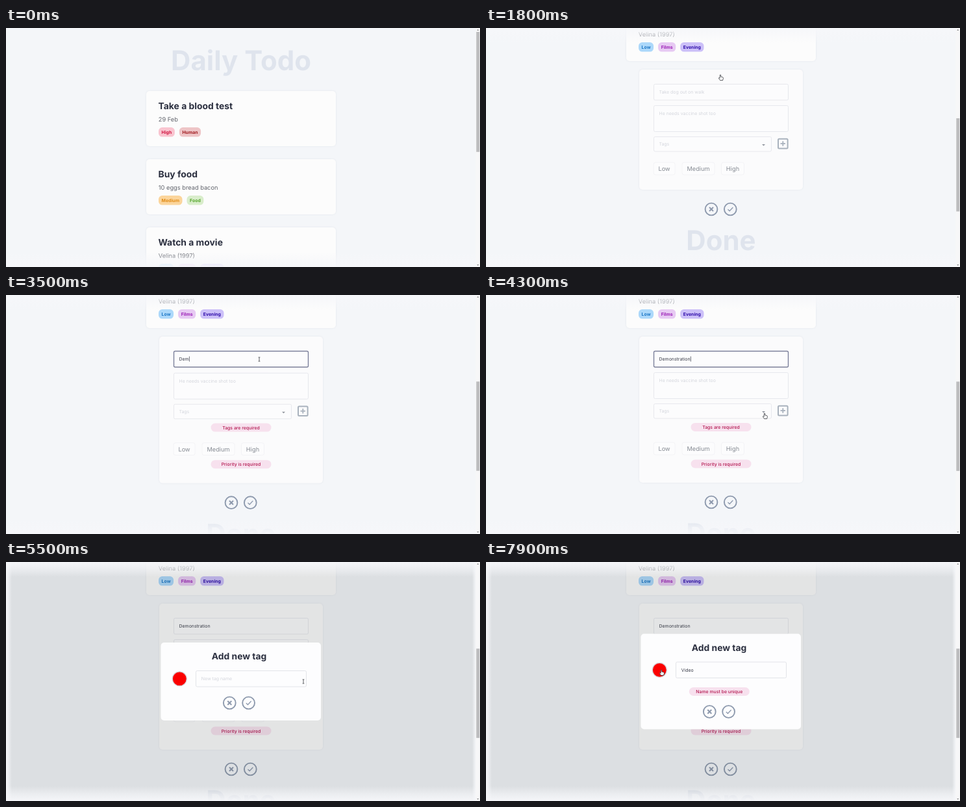
An HTML page with a canvas for the animation above (8 s loop, 730 by 368 pixels).

```html
<!DOCTYPE html>
<html lang="en">
<head>
<meta charset="utf-8">
<title>Daily Todo</title>
<style>
html, body { margin: 0; width: 100%; height: 100%; overflow: hidden; background: #f4f6f9; }
canvas { display: block; width: 730px; height: 368px; }
</style>
</head>
<body>
<canvas id="stage"></canvas>
<script>
const W = 730, H = 368, LOOP = 8000, MAX_SCROLL = 341;
const BG = '#f4f6f9', INK = '#2c3040', SLATE = '#8d99ad';
const canvas = document.getElementById('stage');
const ctx = canvas.getContext('2d');
const dpr = window.devicePixelRatio || 1;
canvas.width = W * dpr;
canvas.height = H * dpr;

const TAGS = {
  High: ['#f9c5d0', '#d0143f'],
  Human: ['#eec5c7', '#a01c20'],
  Medium: ['#fbd59c', '#e08b14'],
  Food: ['#d9edcb', '#52a528'],
  Low: ['#acd8fa', '#1c76c6'],
  Films: ['#e7caf3', '#9c20b6'],
  Evening: ['#ccc0f8', '#2d0ba9'],
  'Computer equipment': ['#cfe6e0', '#289a80']
};
const OPTIONS = ['Work', 'Human', 'Food', 'Films', 'Computer equipment', 'Video', 'Evening'];

// time, x, y of the hotspot, pointer shape from that time on
const POINTER = [
  [450, 357, 97, 'text'], [1050, 357, 97, 'text'], [1300, 361, 72, 'hand'],
  [1900, 361, 72, 'arrow'], [2150, 377, 281, 'hand'], [2850, 377, 281, 'arrow'],
  [3150, 390, 99, 'text'], [3950, 390, 99, 'text'], [4230, 429, 182, 'hand'],
  [4750, 429, 182, 'hand'], [4950, 385, 226, 'hand'], [5080, 385, 226, 'hand'],
  [5300, 462, 179, 'hand'], [5440, 462, 179, 'hand'], [5490, 458, 184, 'text'],
  [6450, 458, 184, 'text'], [6750, 374, 217, 'hand'], [6880, 374, 217, 'arrow'],
  [7120, 594, 246, 'arrow'], [7350, 682, 36, 'arrow'], [7700, 290, 192, 'arrow'],
  [7880, 270, 166, 'hand'], [8000, 270, 166, 'hand']
];

const clamp = v => Math.max(0, Math.min(1, v));
const ramp = (t, a, b) => {
  const k = clamp((t - a) / (b - a));
  return k * k * (3 - 2 * k);
};
const typed = (s, t, start, step) => s.slice(0, Math.max(0, Math.floor((t - start) / step) + 1));

function box(x, y, w, h, r, fill, stroke, line = 1) {
  ctx.beginPath();
  ctx.roundRect(x, y, w, h, r);
  if (fill) { ctx.fillStyle = fill; ctx.fill(); }
  if (stroke) { ctx.strokeStyle = stroke; ctx.lineWidth = line; ctx.stroke(); }
}

function path(points, color, width) {
  ctx.beginPath();
  points.forEach(([x, y], i) => i ? ctx.lineTo(x, y) : ctx.moveTo(x, y));
  ctx.strokeStyle = color;
  ctx.lineWidth = width;
  ctx.stroke();
}

function disc(x, y, r, fill, stroke, line) {
  ctx.beginPath();
  ctx.arc(x, y, r, 0, Math.PI * 2);
  if (fill) { ctx.fillStyle = fill; ctx.fill(); }
  if (stroke) { ctx.strokeStyle = stroke; ctx.lineWidth = line; ctx.stroke(); }
}

// cy is the middle of the capitals
function text(s, x, cy, size, color, weight = 400, align = 'left') {
  ctx.font = `${weight} ${size}px Inter, sans-serif`;
  ctx.textAlign = align;
  ctx.fillStyle = color;
  ctx.fillText(s, x, cy + size * 0.364);
  return ctx.measureText(s).width;
}

function faded(alpha, draw) {
  if (alpha <= 0) return;
  ctx.save();
  ctx.globalAlpha *= alpha;
  draw();
  ctx.restore();
}

function panel(x, y, w, h, r, fill) {
  ctx.save();
  ctx.shadowColor = 'rgba(60,70,100,.09)';
  ctx.shadowBlur = 3 * dpr;
  box(x, y, w, h, r, fill);
  ctx.restore();
}

function tagRow(names, x, cy) {
  for (const name of names) {
    const [bg, fg] = TAGS[name];
    ctx.font = '700 6.9px Inter, sans-serif';
    const w = ctx.measureText(name).width + 9.2;
    box(x, cy - 7.2, w, 14.4, 5.5, bg);
    text(name, x + 4.6, cy, 6.9, fg, 700);
    x += w + 7;
  }
}

function card(y, title, note, tags, done) {
  const h = note ? 85 : 67.5;
  panel(216, y, 292, h, 5, '#fcfcfc');
  if (done) {
    ctx.save();
    ctx.beginPath();
    ctx.rect(503, y - 1, 6, h + 2);
    ctx.clip();
    box(215, y + 0.4, 292.4, h - 0.8, 5, null, '#a9d3b4', 1.3);
    ctx.restore();
  }
  const w = text(title, 234.5, y + 23.3, 13.9, INK, 700);
  if (done) path([[234.5, y + 24.3], [234.5 + w, y + 24.3]], INK, 1.4);
  if (note) text(note, 234.8, y + 44, 9.25, '#62656d');
  tagRow(tags, 235, y + (note ? 63.3 : 45.7));
}

function roundButtons(x, y) {
  const r = 9.4, x2 = x + 29.3;
  disc(x, y, r, null, SLATE, 1.9);
  path([[x - 3, y - 3], [x + 3, y + 3]], SLATE, 2);
  path([[x + 3, y - 3], [x - 3, y + 3]], SLATE, 2);
  disc(x2, y, r, null, SLATE, 1.9);
  path([[x2 - 3.8, y + 0.3], [x2 - 1.2, y + 2.8], [x2 + 4, y - 2.8]], SLATE, 1.3);
}

function errorPill(s, cx, cy, alpha) {
  faded(alpha, () => {
    box(cx - 46.5, cy - 6.5, 93, 13, 6.5, '#f7e1ee');
    text(s, cx, cy, 6.9, '#b3164f', 500, 'center');
  });
}

function form(t, e1, e2, e3) {
  const d1 = 20 * e1, d2 = d1 + 20 * e2, d3 = d2 + 20 * e3;
  const field = '#e7e8ed', hint = '#d4d6dd';
  const focus = t > 3180 && t < 4700;
  const title = typed('Demonstration', t, 3350, 55);
  panel(236, 64, 252, 185 + d3, 5, '#fbfbfc');

  box(258.5, 86.5, 207, 24.5, 2, '#fcfcfd', focus ? '#7d819b' : field, focus ? 1.4 : 1);
  const w = title ? text(title, 266.5, 98.6, 6.95, '#383b47')
    : (text('Take dog out on walk', 266.5, 98.6, 6.95, hint), 0);
  if (focus && (t < 4050 || Math.floor((t - 4050) / 500) % 2 === 0))
    path([[267.3 + w, 94.5], [267.3 + w, 102.5]], '#30333f', 0.7);
  errorPill('Title is required', 362, 124.6, e1);

  box(258.5, 119.5 + d1, 207, 40, 2, '#fcfcfd', field);
  text('He needs vaccine shot too', 266.5, 131.8 + d1, 6.95, hint);

  box(258.5, 167.5 + d1, 181, 22.5, 2, '#fcfcfd', field);
  text('Tags', 266.5, 178.5 + d1, 6.95, hint);
  const up = t > 4700 && t < 5420 ? -1 : 1, cy = 180 + d1;
  ctx.beginPath();
  ctx.moveTo(425, cy - up);
  ctx.lineTo(430, cy - up);
  ctx.lineTo(427.5, cy + 1.5 * up);
  ctx.fillStyle = '#8f949d';
  ctx.fill();

  const hot = t > 5230 && t < 5490;
  const plus = hot ? '#178a48' : '#a9b2bd', py = 178 + d1;
  box(450, py - 7.2, 14.6, 14.6, 1.5, null, plus, 2);
  path([[453.5, py], [461, py]], plus, 1.8);
  path([[457.3, py - 3.8], [457.3, py + 3.8]], plus, 1.8);
  errorPill('Tags are required', 362, 183.4 + d2, e2);

  [['Low', 274.6, 33], ['Medium', 327, 50], ['High', 380, 35]].forEach(([s, x, bw]) => {
    box(x - bw / 2, 207 + d2, bw, 19, 3, '#fcfcfd', '#f3f3f6');
    text(s, x, 216.5 + d2, 9.25, '#868b93', 400, 'center');
  });
  errorPill('Priority is required', 362, 220 + d3, e3);
  roundButtons(347, 279 + d3);
}

function dropdown(alpha) {
  faded(alpha, () => {
    panel(260, 192, 179, 150, 3, '#ffffff');
    OPTIONS.forEach((s, i) => text(s, 267, 203 + i * 22.5, 6.95, '#4c505c'));
    box(434.5, 194, 3.5, 112, 1.5, '#c6c8cd');
  });
}

function page(t, scroll, formIn, errors) {
  const shift = 204 * formIn + 20 * errors.reduce((a, b) => a + b);
  ctx.save();
  ctx.translate(0, MAX_SCROLL - scroll);
  text('Daily Todo', 362, -291, 42, '#dfe4ed', 700, 'center');
  card(-244, 'Take a blood test', '29 Feb', ['High', 'Human']);
  card(-139, 'Buy food', '10 eggs bread bacon', ['Medium', 'Food']);
  card(-34, 'Watch a movie', 'Velina (1997)', ['Low', 'Films', 'Evening']);
  faded(1 - formIn, () => {
    disc(362, 73, 10.4, '#dde2ec');
    path([[357.5, 73], [366.5, 73]], '#fbfcfd', 1.8);
    path([[362, 68.5], [362, 77.5]], '#fbfcfd', 1.8);
  });
  ctx.save();
  ctx.translate(0, shift);
  text('Done', 362, 123, 42, '#dfe4ed', 700, 'center');
  card(170, 'Make a new dish', 'Risotto with shrimp', ['Low', 'Food'], true);
  card(275, 'Buy a new microphone', '', ['Medium', 'Computer equipment'], true);
  ctx.restore();
  faded(formIn, () => form(t, ...errors));
  ctx.restore();
  return 709 + shift;
}

function edgeFade(x0, y0, x1, y1, x, y, w, h) {
  const g = ctx.createLinearGradient(x0, y0, x1, y1);
  g.addColorStop(0, 'rgba(246,247,250,.95)');
  g.addColorStop(0.45, 'rgba(246,247,250,.6)');
  g.addColorStop(1, 'rgba(246,247,250,0)');
  ctx.fillStyle = g;
  ctx.fillRect(x, y, w, h);
}

function scrollbar(scroll, height) {
  ctx.fillStyle = '#f7f7f8';
  ctx.fillRect(723.5, 0, 6.5, H);
  ctx.fillStyle = '#bcbcbe';
  ctx.fillRect(724.3, 6 + 356 * scroll / height, 5, 356 * H / height);
  ctx.fillStyle = '#77787a';
  for (const [y, d] of [[3, -1], [365, 1]]) {
    ctx.beginPath();
    ctx.moveTo(725.3, y - d * 0.8);
    ctx.lineTo(728.3, y - d * 0.8);
    ctx.lineTo(726.8, y + d);
    ctx.fill();
  }
}

function modal(t, grow) {
  const half = 60 + 13.5 * grow, top = 184 - half;
  box(238.5, top, 246.5, half * 2, 5, '#fdfdfe');
  text('Add new tag', 359, top + 21, 13.85, INK, 700, 'center');
  disc(267.3, top + 55.8, 11, '#fb0000', '#d5d3d8', 1.2);
  box(292.5, top + 43.5, 170, 24.5, 2, '#fdfdfe', '#e3e4e9');
  const name = typed('Video', t, 6330, 60);
  text(name || 'New tag name', 300.8, top + 55.9, 6.95, name ? '#383b47' : '#d4d6dd');
  errorPill('Name must be unique', 359.3, top + 89, grow);
  roundButtons(344.3, top + 93 + 27 * grow);
}

function pointer(t) {
  if (t < POINTER[0][0]) return;
  const i = POINTER.findIndex((p, n) => n === POINTER.length - 1 || t < POINTER[n + 1][0]);
  const a = POINTER[i], b = POINTER[i + 1] || a;
  const k = ramp(t, a[0], b[0] + 0.01);
  ctx.save();
  ctx.translate(a[1] + (b[1] - a[1]) * k, a[2] + (b[2] - a[2]) * k);
  if (a[3] === 'text') {
    path([[0, -3], [0, 3]], '#33363c', 0.8);
    path([[-1.4, -3.1], [1.4, -3.1]], '#33363c', 0.7);
    path([[-1.4, 3.1], [1.4, 3.1]], '#33363c', 0.7);
  } else {
    const shape = a[3] === 'hand'
      ? 'M-.7 .4Q0-.6.7.4L.8 3 3.2 3.6Q4.6 4 4.4 5.4L3.6 8.6H-.4L-2.6 5.4Q-2.6 4.3-1.6 4.7L-.8 5.4Z'
      : 'M0 0V7.4L1.7 5.9 2.8 8.3 4 7.8 2.9 5.5H5.2Z';
    const p = new Path2D(shape);
    ctx.fillStyle = '#fff';
    ctx.strokeStyle = '#34373d';
    ctx.lineWidth = 0.8;
    ctx.fill(p);
    ctx.stroke(p);
  }
  ctx.restore();
}

function draw(t) {
  ctx.setTransform(dpr, 0, 0, dpr, 0, 0);
  ctx.textRendering = 'geometricPrecision';
  ctx.fillStyle = BG;
  ctx.fillRect(0, 0, W, H);

  const scroll = MAX_SCROLL * ramp(t, 100, 900);
  const formIn = ramp(t, 1420, 1720);
  const shown = ramp(t, 2230, 2400);
  const errors = [shown - ramp(t, 3350, 3520), shown, shown];
  const height = page(t, scroll, formIn, errors);
  dropdown(ramp(t, 4680, 4830) - ramp(t, 5130, 5430));

  const dim = ramp(t, 5430, 5490);
  faded(dim, () => {
    ctx.fillStyle = 'rgba(40,45,50,.115)';
    ctx.fillRect(0, 0, W, H);
    edgeFade(0, 0, 9, 0, 0, 0, 9, H);
    edgeFade(724, 0, 718, 0, 718, 0, 6, H);
  });
  if (scroll > 0) faded(clamp(scroll / 40), () => edgeFade(0, 0, 0, 23, 0, 0, W, 23));
  edgeFade(0, H, 0, 345, 0, 345, W, 23);
  scrollbar(scroll, height);
  faded(dim, () => modal(t, ramp(t, 6850, 7000)));
  pointer(t);
}

const start = performance.now();
function tick() {
  draw((performance.now() - start) % LOOP);
  requestAnimationFrame(tick);
}
tick();
</script>
</body>
</html>
```
